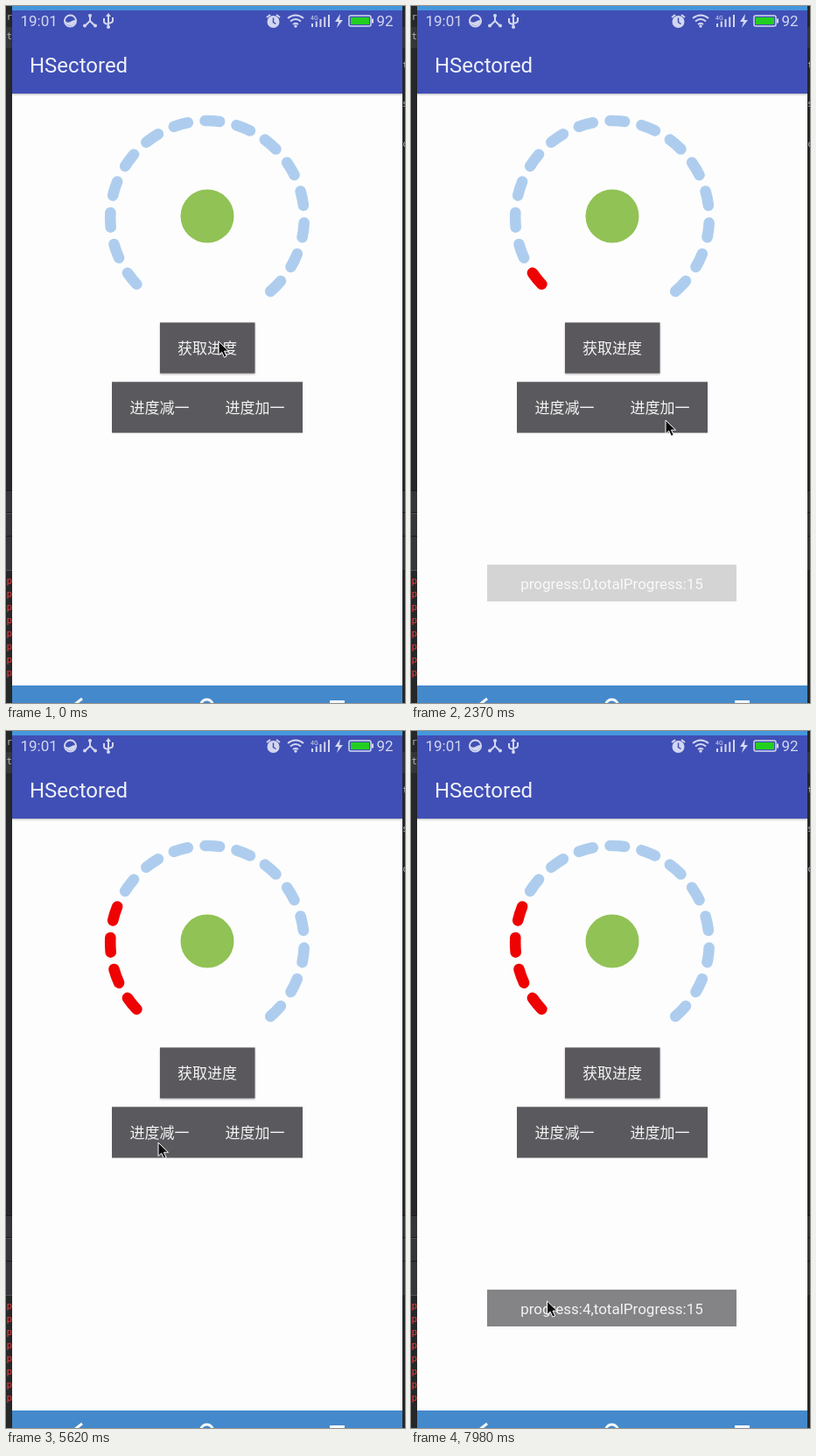
Write an HTML page that moves like this. It is 456 px wide and 796 px high and loops after 8 s.

```html
<!DOCTYPE html>
<html lang="zh-CN">
<head>
<meta charset="utf-8">
<title>HSectored</title>
<style>
  html, body { margin: 0; width: 100%; height: 100%; overflow: hidden; background: #fdfdfd; }
  svg { display: block; width: 456px; height: 796px; }
  text { font-family: Roboto, sans-serif; font-size: 17px; }
  .title { font-size: 24px; fill: #eef0f9; }
  .label { font-family: "Noto Sans CJK SC", "Noto Sans CJK", sans-serif; fill: #f4f4f4; text-anchor: middle; }
  .side { font-family: "DejaVu Sans Mono", monospace; font-size: 11px; fill: #b0b4b8; }
  .log { fill: #f0383c; }
  .status { fill: #d3d7ef; }
  .line { fill: none; stroke: #d3d7ef; stroke-width: 2; }
</style>
</head>
<body>
<svg viewBox="0 0 456 796">
  <defs>
    <filter id="shade" x="-10%" y="-20%" width="120%" height="150%">
      <feDropShadow dx="0" dy="1" stdDeviation=".8" flood-color="#000" flood-opacity=".3"/>
    </filter>
  </defs>

  <path fill="#262728" d="M0 0h456v796H0z"/>
  <path fill="#343638" d="M0 24h456v24H0zM0 554h456v90H0z"/>
  <path stroke="#1a1b1c" d="M0 553.5h456M0 578.5h456M0 605.5h456"/>
  <path stroke="#505254" d="M0 579.5h7M0 644.5h7"/>
  <g id="log">
    <text class="side" x="-6" y="16">or</text>
    <text class="side" x="-6" y="38">ct</text>
    <text class="side" x="453" y="71">t</text>
    <text class="side" x="453" y="115">s</text>
    <text class="side" x="453" y="161">c</text>
  </g>

  <path fill="#fdfdfd" d="M7 5h446v791H7z"/>
  <path fill="#3f50b5" filter="url(#shade)" d="M7 5h446v95H7z"/>
  <path fill="#4597dd" d="M7 0h446v5H7z"/>
  <text class="title" x="27" y="76">HSectored</text>

  <g id="status" class="status">
    <text x="16.5" y="23">19:01</text>
    <text x="423.5" y="23">92</text>
    <circle class="line" cx="73.5" cy="17" r="6.5"/>
    <path d="M67.5 17q3 3 6 1t6-2a6 6 0 0 1-12 1z"/>
    <path class="line" d="M96 11v6l-6 6M96 17l6 6"/>
    <circle cx="96" cy="11" r="2"/><circle cx="90" cy="22.5" r="2"/><circle cx="102" cy="22.5" r="2"/>
    <path class="line" d="M117 10v14M112 14v4q0 2 5 3M122 13v4q0 2-5 3"/>
    <path d="M117 8l3 4h-6z"/><circle cx="117" cy="24" r="2"/>
    <circle cx="305.5" cy="18" r="7"/>
    <path class="line" d="M298 13l4-3M313 13l-4-3"/>
    <path stroke="#3f50b5" stroke-width="1.5" fill="none" d="M305.5 13.5v5l3 2"/>
    <path class="line" d="M322 14q9-7 18 0M325 17.5q6-5 12 0M328 21q3-2.5 6 0"/>
    <circle cx="331" cy="23" r="1.7"/>
    <text x="348" y="16" style="font-size:7px">4G</text>
    <path d="M382 9l-6 9h4l-2 7 7-9h-4z"/>
    <rect class="line" x="392" y="11" width="25" height="12" rx="2" style="stroke-width:1.5"/>
    <path d="M418 14.5h2v5h-2z"/>
    <path fill="#22cf20" d="M394 13h21v8h-21z"/>
  </g>

  <g id="ring" fill="none" stroke-width="12.6" stroke-linecap="round"></g>
  <circle cx="230" cy="240" r="30.5" fill="#91c255"/>

  <path fill="#5a595d" filter="url(#shade)" d="M176 361.5h108.5v58H176z"/>
  <path fill="#5a595d" d="M121 429.300h218v58.200h-218z"/>
  <text class="label" x="230" y="397">获取进度</text>
  <text class="label" x="175.5" y="465">进度减一</text>
  <text class="label" x="284.5" y="465">进度加一</text>

  <g id="toast">
    <path fill="#848386" d="M87 638h285v42H87z"/>
    <text id="message" x="229.5" y="665.5" text-anchor="middle" fill="#f3f3f3"></text>
  </g>

  <path fill="#4489cb" d="M7 776h446v20H7z"/>
  <g fill="none" stroke="#f6f9fc" stroke-width="3">
    <path d="M87 791l-9 7"/>
    <circle cx="229.5" cy="799" r="7"/>
    <path d="M371.500 800v-5.500h14v5.500"/>
  </g>

  <path id="cursor" fill="#0c0c0c" stroke="#fff" stroke-linejoin="round"
        d="M0 0v15.500l3.700-3.300 2.700 6 2.800-1.200-2.700-5.800h5z"/>
</svg>
<script>
const LOOP = 8000, STEP = 147.8, LEAD = 9;
const $ = id => document.getElementById(id);
const clamp = (v, lo, hi) => Math.min(hi, Math.max(lo, v));
const ease = p => p * p * (3 - 2 * p);

function add(parent, tag, attrs, text = "") {
  const el = document.createElementNS("http://www.w3.org/2000/svg", tag);
  for (const key in attrs) el.setAttribute(key, attrs[key]);
  el.textContent = text;
  return parent.appendChild(el);
}

// Fifteen round dashes, clockwise from the lower left.
const R = 110.8;
const polar = deg => {
  const a = deg * Math.PI / 180;
  return `${230 + R * Math.cos(a)} ${241.8 + R * Math.sin(a)}`;
};
const dashes = Array.from({ length: 15 }, (_, i) => {
  const mid = 141 + i * 18.86;
  return add($("ring"), "path", { d: `M${polar(mid - 4.3)}A${R} ${R} 0 0 1 ${polar(mid + 4.3)}` });
});

for (let i = 0; i < 8; i++) {
  add($("log"), "text", { class: "side log", x: -6, y: 660 + i * 15 }, "up");
}
for (let i = 0; i < 5; i++) {
  const height = 4 + i * 2.5;
  add($("status"), "rect", { x: 349 + i * 4.75, y: 24 - height, width: 2, height });
}

// Pointer moves: first step, last step, where it ends.
const home = { x: 243, y: 383 };
const moves = [
  { from: 4, to: 9, x: 297, y: 503 },
  { from: 9, to: 12, x: 291, y: 473 },
  { from: 18, to: 20, x: 282, y: 456 },
  { from: 34, to: 36, x: 228, y: 497 },
  { from: 36, to: 38, x: 174, y: 470 },
  { from: 38, to: 41, x: 212, y: 402 },
  { from: 46, to: 52, x: 256, y: 552 },
  { from: 52, to: 54, x: 155.5, y: 651 }
];

function pointer(step) {
  let { x, y } = home;
  for (const m of moves) {
    const p = ease(clamp((step - m.from) / (m.to - m.from), 0, 1));
    x += (m.x - x) * p;
    y += (m.y - y) * p;
  }
  return `translate(${x} ${y})`;
}

const fade = (step, first, last) => clamp(Math.min((step - first + 1) * 0.39, (last - step) / 3), 0, 1);

function draw(t) {
  const step = Math.floor((t + LEAD) / STEP);
  const progress = clamp(Math.floor((step - 10) / 6), 0, 4);
  const second = step >= 45;
  $("cursor").setAttribute("transform", pointer(step));
  $("toast").setAttribute("opacity", second ? fade(step, 45, 60) : fade(step, 1, 17));
  $("message").textContent = `progress:${second ? progress : 0},totalProgress:15`;
  dashes.forEach((dash, i) => dash.setAttribute("stroke", i < progress ? "#ee0202" : "#aecdee"));
}

const start = performance.now();
function tick() {
  draw((performance.now() - start) % LOOP);
  requestAnimationFrame(tick);
}
tick();
</script>
</body>
</html>
```
